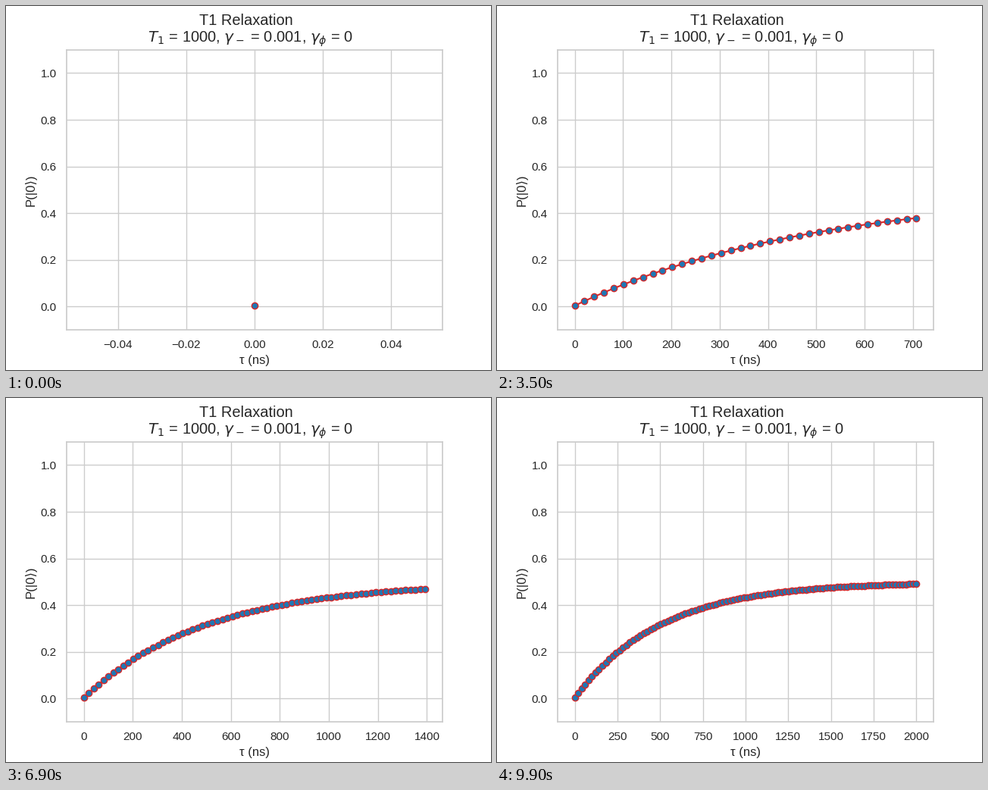
Animation, 640 px wide and 480 px high, one loop 10 s. Source, as a matplotlib script:

```python
import numpy as np
import matplotlib.pyplot as plt
from matplotlib.animation import FuncAnimation

FRAMES = 100
INTERVAL = 100
T1 = 1000
PULSE = 4  # ns of decay before the first delay

INK = "0.15"
RULE = "0.8"

plt.rcParams.update({
    "font.family": ["Liberation Sans", "DejaVu Sans"],
    "font.size": 12,
    "text.color": INK,
    "axes.labelcolor": INK,
    "axes.labelsize": 12,
    "axes.edgecolor": RULE,
    "axes.linewidth": 1.25,
    "axes.grid": True,
    "axes.axisbelow": True,
    "grid.color": RULE,
    "grid.linewidth": 1,
    "lines.solid_capstyle": "round",
    "xtick.color": INK,
    "ytick.color": INK,
    "xtick.labelsize": 11,
    "ytick.labelsize": 11,
    "xtick.major.size": 6,
    "ytick.major.size": 6,
    "xtick.bottom": False,
    "ytick.left": False,
})

tau = np.linspace(0, 2 * T1, FRAMES)
prob = 0.5 * (1 - np.exp(-2 * (tau + PULSE) / T1))

fig, ax = plt.subplots(figsize=(6.4, 4.8), dpi=100)
fig.suptitle("T1 Relaxation \n"
             rf" $T_1$ = {T1}, $\gamma_-$ = {1 / T1}, $\gamma_\phi$ = 0",
             fontsize=14.4)
ax.set(xlabel="τ (ns)", ylabel="P(|0⟩)", ylim=(-0.1, 1.1))
line, = ax.plot([], [], "o-", color="tab:red", lw=1.5, ms=6,
                markerfacecolor="tab:blue", markeredgewidth=1)


def update(i):
    line.set_data(tau[:i + 1], prob[:i + 1])
    ax.relim()
    ax.autoscale_view(scaley=False)
    return line,


anim = FuncAnimation(fig, update, frames=FRAMES, interval=INTERVAL,
                     repeat=True, repeat_delay=0)
plt.show()
```
